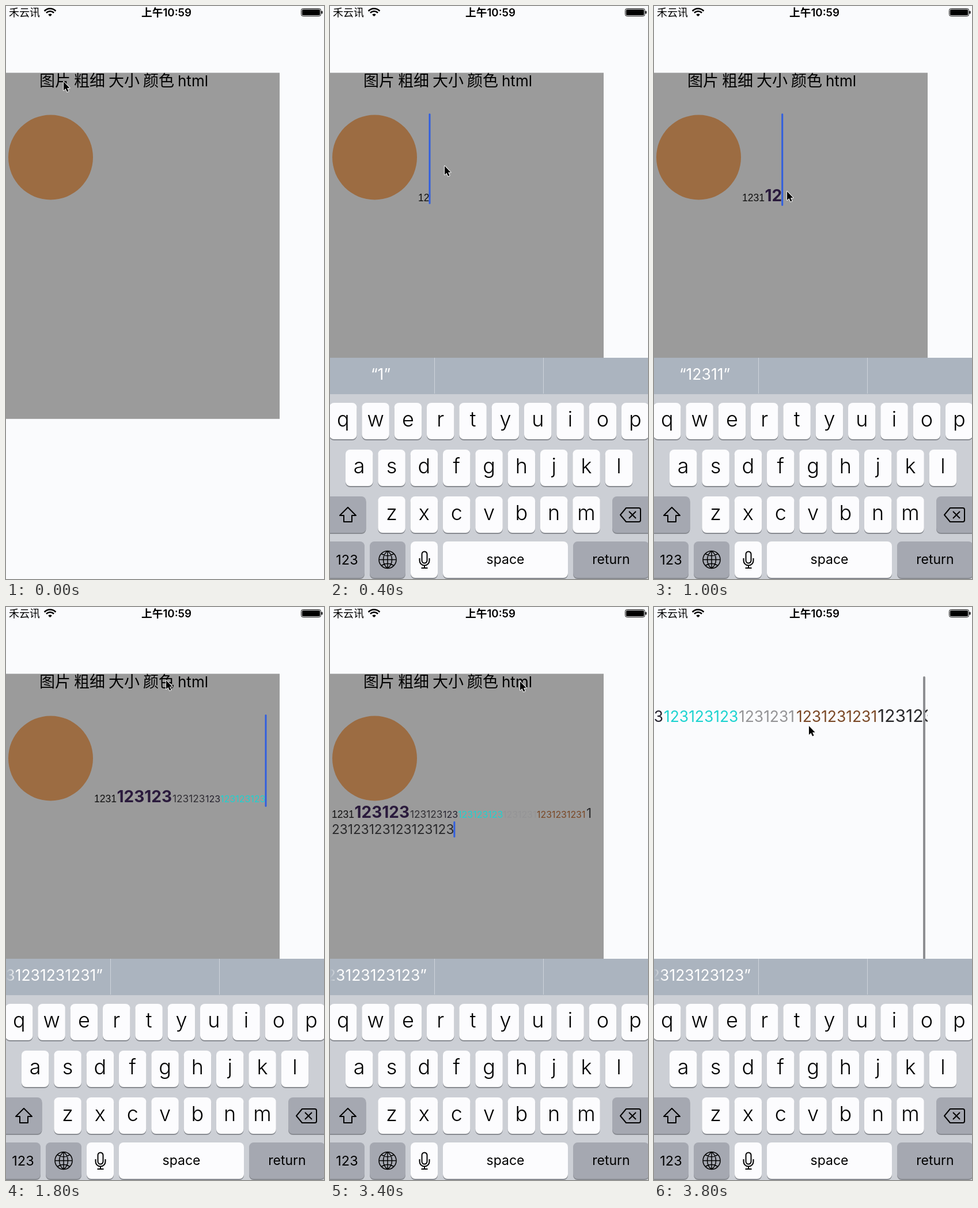
Animation of 552x992 px, one loop 4 s. Source, as an HTML page with a canvas:

```html
<!DOCTYPE html>
<html lang="zh">
<head>
<meta charset="utf-8">
<style>
html, body { margin: 0; width: 100%; height: 100%; overflow: hidden; background: #fafbfd; }
canvas { display: block; }
</style>
</head>
<body>
<canvas id="stage" width="552" height="992"></canvas>
<script>
const c = document.getElementById('stage').getContext('2d');
const SANS = 'Inter, "Noto Sans CJK SC", "Noto Sans CJK", sans-serif';
const ARIAL = '"Liberation Sans", sans-serif';
const PAGE = '#fafbfd', BAR = '#abb4bf', STEP = 200;

// Styled runs: text, colour, weight, editor size, editor offset, web size, web x
const runs = [
  ['1231', '#111', 400, 17.5, 0, 27, 85],
  ['123123', '#2a1a3c', 700, 28, 39.5, 45, 150],
  ['123123', '#302e33', 400, 17.3, 136, 28, 307],
  ['123', '#25222e', 400, 16, 193, 26.4, 401],
  ['123123123', '#1dd3d0', 400, 16, 219, 26.4, 445],
  ['1231231', '#949496', 400, 15.9, 297, 26.4, 575],
  ['1231231231', '#7a4826', 400, 15.9, 356, 26.4, 675],
  ['123123123123123123', '#29292b', 400, 22.6, 442, 30, 816]
];
const allText = runs.map(r => r[0]).join('');

// Pointer x, y, typed characters, suggested characters, caret visible
const steps = [
  [100, 131, 0, 0, 0], [185, 262, 0, 0, 1], [199, 277, 2, 1, 1], [190, 260, 4, 4, 1],
  [143, 129, 4, 4, 1], [231, 321, 6, 5, 1], [208, 126, 15, 14, 1], [262, 128, 19, 18, 1],
  [264, 131, 25, 23, 1], [278, 127, 28, 26, 1], [272, 127, 32, 30, 1], [268, 126, 35, 35, 1],
  [266, 127, 45, 43, 1], [266, 131, 45, 45, 0], [215, 135, 45, 45, 1], [215, 136, 53, 51, 1],
  [334, 125, 63, 61, 1], [330, 129, 63, 63, 1], [310, 180, 63, 63, 0], [269, 206, 63, 63, 0]
];

function rect(x, y, w, h, color) {
  c.fillStyle = color;
  c.fillRect(x, y, w, h);
}
function box(x, y, w, h, r, color) {
  c.fillStyle = color;
  c.beginPath();
  c.roundRect(x, y, w, h, r);
  c.fill();
}
function disc(x, y, r, color) {
  c.fillStyle = color;
  c.beginPath();
  c.arc(x, y, r, 0, 7);
  c.fill();
}
function text(s, x, y, size, color = '#000', align = 'left', weight = 400, family = SANS) {
  c.font = `${weight} ${size}px ${family}`;
  c.textAlign = align;
  c.fillStyle = color;
  c.fillText(s, x, y);
  return c.measureText(s).width;
}
function line(d, width = 2, color = '#000') {
  c.lineWidth = width;
  c.strokeStyle = color;
  c.lineJoin = 'round';
  c.stroke(new Path2D(d));
}
function clipped(x, y, w, h, draw) {
  c.save();
  c.beginPath();
  c.rect(x, y, w, h);
  c.clip();
  draw();
  c.restore();
}

function statusBar() {
  text('禾云讯', 5, 18, 18);
  text('上午10:59', 278.5, 17.5, 18.7, '#000', 'center', 600);
  for (const r of [4.5, 9, 13.5]) {
    c.beginPath();
    if (r < 5) c.moveTo(76.5, 18);
    c.arc(76.5, 18, r, -Math.PI * 0.76, -Math.PI * 0.24);
    c.lineWidth = 2.6;
    c.strokeStyle = c.fillStyle = '#000';
    r < 5 ? c.fill() : c.stroke();
  }
  c.lineWidth = 1;
  c.beginPath();
  c.roundRect(512.5, 4.5, 34, 13, 3);
  c.stroke();
  box(514, 6, 31, 10, 1.5, '#000');
  box(547.5, 8.5, 2, 5, 1, '#000');
}

function editor(n, caret) {
  rect(0, 115.6, 475, 599.2, '#9b9b9b');
  ['图片', '粗细', '大小', '颜色', 'html'].forEach((s, i) => text(s, 58 + i * 60, 139, i < 4 ? 27 : 26));
  disc(77.5, 262, 73.5, '#9c6c42');
  const wrapped = n > 30;
  const left = wrapped ? 3 : 153, base = wrapped ? 365 : 338;
  let end = left, top = 186, height = n > 4 ? 160 : 157;
  runs.forEach(([s, color, weight, size, dx], i) => {
    const part = s.slice(0, Math.max(0, n));
    n -= s.length;
    if (!part) return;
    const last = i === runs.length - 1;
    const family = i ? SANS : ARIAL;
    end = left + dx + text(last ? part[0] : part, left + dx, base, size, color, 'left', weight, family);
    if (wrapped) [top, height] = [341, 29];
    if (last && part.length > 1) {
      end = 3 + text(part.slice(1), 3, 393, size, color);
      [top, height] = [371, 28];
    }
  });
  if (caret) box(end - 1, top, 3, height, 1.5, '#315fe0');
}

function webView(scroll) {
  clipped(0, 115, 475, 600, () => {
    disc(46 - scroll, 161, 37, '#9c6c42');
    for (const [s, color, weight, , , size, x] of runs) text(s, x - scroll, 199, size, color, 'left', weight);
  });
  if (scroll) box(467, 120, 4, 580, 2, '#8e8f92');
}

function key(x, y, w, label, size, dark, weight = 400) {
  box(x, y + 2, w, 63, 8, '#888b91');
  box(x, y, w, 63, 8, dark ? '#a5a8b1' : '#fcfcfe');
  text(label, x + w / 2, y + (size > 30 ? 41 : 39), size, '#000', 'center', weight);
}

function suggestion(count) {
  if (!count) return;
  const s = `“${allText.slice(0, count)}”`;
  c.font = `400 26.5px ${SANS}`;
  clipped(0, 609, 181, 63, () => {
    if (c.measureText(s).width < 165) return text(s, 88, 647, 26.5, '#fff', 'center');
    text(s, 168, 647, 26.5, '#fff', 'right');
    const fade = c.createLinearGradient(0, 0, 18, 0);
    fade.addColorStop(0, BAR);
    fade.addColorStop(1, 'rgba(171,180,191,0)');
    rect(0, 609, 18, 62, fade);
  });
}

function keyboard(count) {
  rect(0, 609, 552, 383, '#cccfd5');
  rect(0, 609, 552, 63, BAR);
  rect(181, 609, 1, 62, '#ced4db');
  rect(370, 609, 1, 62, '#ced4db');
  suggestion(count);
  [['qwertyuiop', -1], ['asdfghjkl', 27], ['zxcvbnm', 83.3]].forEach(([row, x], r) =>
    [...row].forEach((ch, i) => key(x + i * 56.33, 687 + r * 81, 47.5, ch, 36, false, 300)));
  key(-8, 849, 70.5, '', 24, true);
  key(490, 849, 70, '', 24, true);
  key(-8, 927, 68, '', 24, true);
  text('123', 29.5, 967, 23.5, '#000', 'center');
  key(69, 927, 62, '', 24, true);
  key(140, 927, 47, '', 24);
  key(196, 927, 217, 'space', 23);
  key(422, 927, 132, 'return', 23, true);
  line('M31 868 L45 882 H38 V893 H24 V882 H17Z');
  line('M514 869 H536 Q539 869 539 872 V890 Q539 893 536 893 H514 L504 881Z M519 875 L531 887 M531 875 L519 887');
  line('M85 958.5 a15 15 0 1 0 30 0 a15 15 0 1 0 -30 0 H115 M100 943.5 V973.5' +
    'M100 943.5 C90 951 90 966 100 973.5 C110 966 110 951 100 943.5' +
    'M89.5 948.5 Q100 955 110.5 948.5 M89.5 968.5 Q100 962 110.5 968.5', 1.5);
  line('M159.5 949 a4.5 4.5 0 0 1 9 0 V960 a4.5 4.5 0 0 1 -9 0Z' +
    'M155.5 956 V960 a8.5 8.5 0 0 0 17 0 V956 M164 969 V973 M158.5 973 H169.5');
}

function pointer(x, y) {
  c.save();
  c.translate(x, y);
  const d = 'M0 0 V15 L3.5 12 L6 17.5 L8.5 16.5 L6 11 H10.5Z';
  line(d, 2, '#f4f4f4');
  c.fillStyle = '#000';
  c.fill(new Path2D(d));
  c.restore();
}

function draw(now) {
  const i = Math.floor(now / STEP) % steps.length;
  const [x, y, typed, suggested, caret] = steps[i];
  rect(0, 0, 552, 992, PAGE);
  statusBar();
  if (i < 18) editor(typed, caret);
  else webView(i === 18 ? 0 : 428);
  if (i) keyboard(suggested);
  pointer(x, y);
  requestAnimationFrame(draw);
}
requestAnimationFrame(draw);
</script>
</body>
</html>
```
